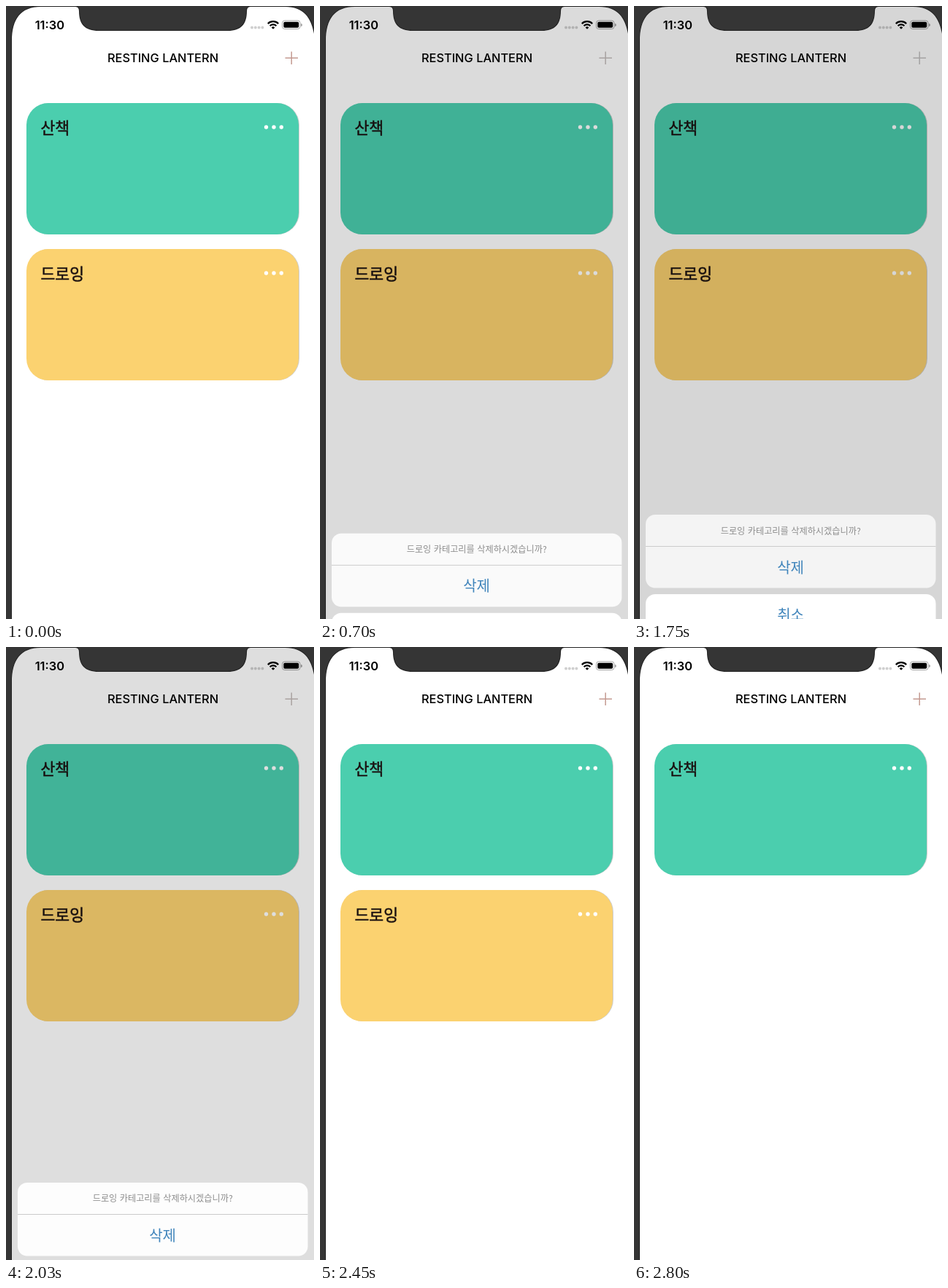
These frames come from a looping animation (422 by 840 pixels, 3220 ms). An HTML page:

```html
<!DOCTYPE html>
<html lang="ko">
<head>
<meta charset="utf-8">
<title>Card list with delete sheet</title>
<style>
  html, body { margin: 0; height: 100%; overflow: hidden; background: #353535; }
  svg { display: block; width: 100%; height: 100%; }
  text { font-family: "Noto Sans CJK KR", "Noto Sans CJK", sans-serif; }
  .latin { font: 500 16.4px Inter, sans-serif; }
  .title { font-size: 21.6px; font-weight: 500; fill: #1a1010; stroke: #1a1010; stroke-width: .5; }
  .action { font-size: 20px; fill: #3f84bb; text-anchor: middle; }
  .message { font-size: 12.2px; fill: #8e8e8e; text-anchor: middle; }
</style>
</head>
<body>
<svg viewBox="0 0 422 840">
  <defs>
    <path id="screen" d="M8 842V48C8 18 20 1 48 1H95Q100 1 100 7C100 25 108 34 127 34H304C322 34 330 25 330 7Q330 1 335 1H382C408 1 418 16 422 38L425 60V842Z"/>
    <g id="card">
      <rect x="29" y="133" width="373" height="180" rx="30" fill="#0003"/>
      <rect x="28" y="133" width="373" height="180" rx="30" fill="currentColor"/>
      <g fill="#fff">
        <circle cx="356.5" cy="166" r="2.7"/>
        <circle cx="367" cy="166" r="2.7"/>
        <circle cx="377.3" cy="166" r="2.7"/>
      </g>
    </g>
  </defs>

  <rect width="422" height="840" fill="#353535"/>
  <use href="#screen" fill="#fff" stroke="#222" stroke-width="2" paint-order="stroke"/>

  <text class="latin" x="39.7" y="31.5" style="font-weight:600">11:30</text>
  <path d="M337 29.5h14.5" stroke="#cfcfcf" stroke-width="4" stroke-linecap="round" stroke-dasharray="0 4.8"/>
  <g fill="none" stroke="#000" stroke-width="2.2">
    <path d="M358.8 24.2a10.2 10.2 0 0 1 14.4 0M361.6 27.2a6.3 6.3 0 0 1 8.8 0"/>
    <path d="M366 31.8l-2.3 -2.4a3.3 3.3 0 0 1 4.6 0z" fill="#000" stroke="none"/>
  </g>
  <rect x="378.5" y="20" width="24.5" height="11.5" rx="3.3" fill="none" stroke="#a5a5a5"/>
  <rect x="380.3" y="21.8" width="20.9" height="7.9" rx="1.8"/>
  <path d="M404 24a2 2 0 0 1 0 4z" fill="#a5a5a5"/>

  <text class="latin" x="215" y="77" text-anchor="middle">RESTING LANTERN</text>
  <path id="plus" d="M382.5 71.2h17.5M391.2 62.5v17.5" stroke-width="1.5"/>

  <use href="#card" color="#4bceae"/>
  <text class="title" x="47.5" y="174.5">산책</text>
  <g id="drawing">
    <use href="#card" y="200" color="#fbd270"/>
    <text class="title" x="47.5" y="374.5">드로잉</text>
  </g>

  <use id="dim" href="#screen"/>

  <g id="sheet">
    <rect id="panel" x="16" y="697" width="397.5" height="100.5" rx="13"/>
    <path d="M16 740.5H413.5" stroke="#cbcbcb"/>
    <text class="message" x="214.7" y="723.5">드로잉 카테고리를 삭제하시겠습니까?</text>
    <text class="action" x="214.6" y="776.7">삭제</text>
    <rect x="16" y="806" width="397.5" height="57" rx="13" fill="#fff"/>
    <text class="action" x="214.6" y="841.7" font-weight="500">취소</text>
  </g>
</svg>
<script>
const LOOP = 3220, STEP = 70, TRAVEL = 199;
const $ = id => document.getElementById(id);
const clamp = x => Math.min(1, Math.max(0, x));
const mix = (a, b, k) => Math.round(a + (b - a) * k);

// Critically damped spring from 0 to 1
const spring = ms => {
  const s = Math.max(0, ms) * 0.01826;
  return 1 - (1 + s) * Math.exp(-s);
};

// How far the sheet is open; it pops in already well under way
function openness(t) {
  if (t < 700 || t >= 2170) return 0;
  return t < 1987 ? spring(t - 505) : 1 - spring(t - 1987);
}

function render(t) {
  const open = openness(t);
  $('dim').setAttribute('opacity', 0.16 * open);
  $('plus').setAttribute('stroke', `rgb(${mix(196, 195, open)},${mix(154, 193, open)},${mix(145, 193, open)})`);

  const grey = Math.min(255, mix(244, 290, 1 - open));
  $('panel').setAttribute('fill', `rgb(${grey},${grey},${grey})`);
  $('sheet').setAttribute('transform', `translate(0 ${TRAVEL * (1 - open)})`);
  $('sheet').setAttribute('visibility', open ? 'visible' : 'hidden');

  const gone = clamp((t - 2450) / 280);
  $('drawing').setAttribute('opacity', 1 - gone * gone * (3 - 2 * gone));
}

const start = performance.now();
function tick() {
  const t = (performance.now() - start) % LOOP;
  render(Math.floor(t / STEP) * STEP);
  requestAnimationFrame(tick);
}
tick();
</script>
</body>
</html>
```
